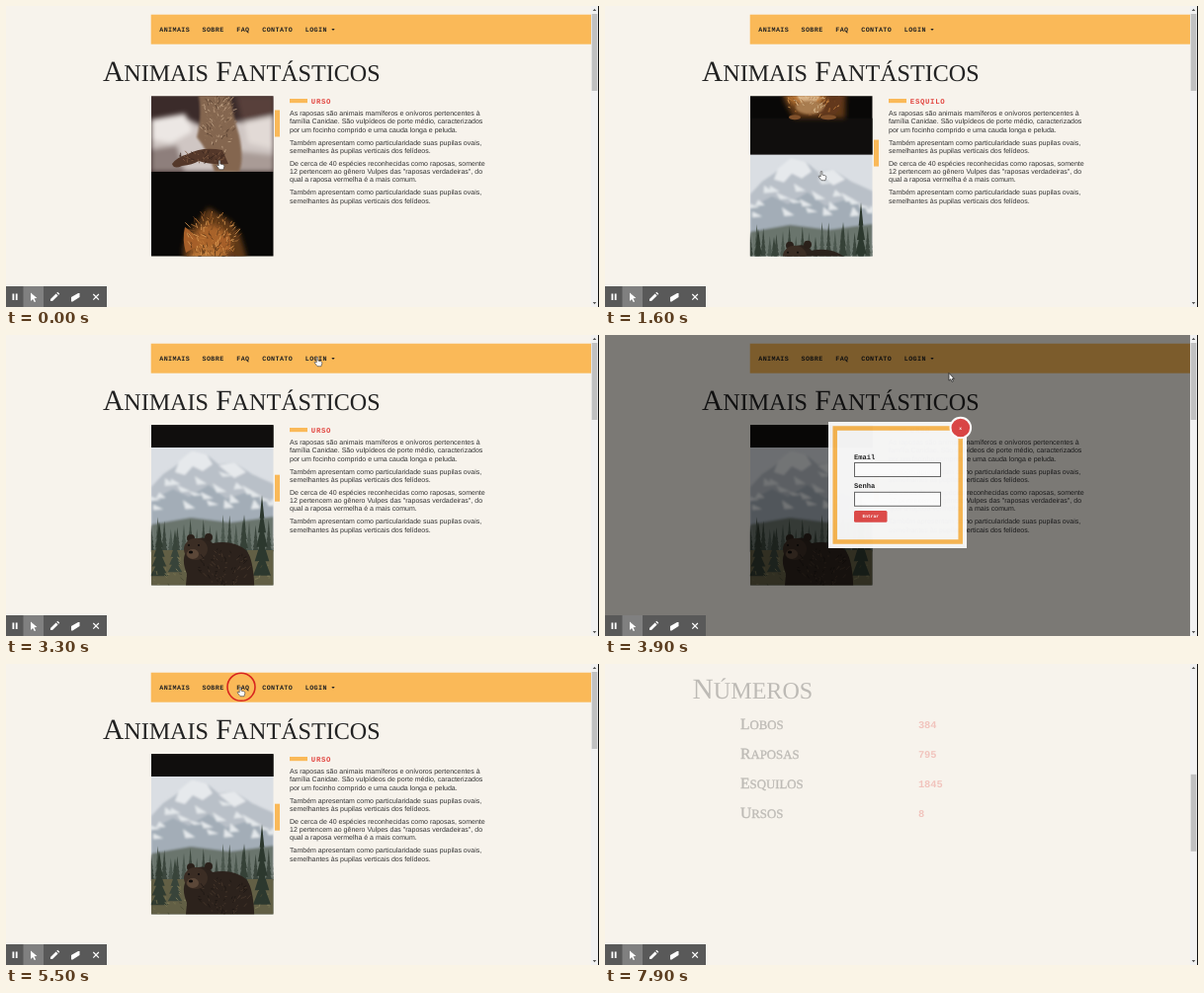
An HTML page for the animation above (8 s loop, 600 by 305 pixels).

```html
<!DOCTYPE html>
<html lang="pt">
<head>
<meta charset="utf-8">
<title>Animais</title>
<style>
html, body { margin: 0; width: 100%; height: 100%; overflow: hidden; background: #f7f3ec; }
svg { display: block; width: 600px; height: 305px; }
text { white-space: pre; text-rendering: geometricPrecision; }
.title, .sub { font-family: "Liberation Serif", "Noto Serif", serif; fill: #222; }
.title { font-size: 29.4px; }
.sub { font-size: 15.6px; stroke: #222; stroke-width: .35; }
.small { font-size: .82em; }
.mono { font: bold 7.1px "Liberation Mono", "DejaVu Sans Mono", monospace; fill: #222; }
.nav { font-size: 6.7px; letter-spacing: .4px; }
.label { font-size: 7.3px; letter-spacing: .7px; }
.red { fill: #e2453f; }
.count { font-size: 10.4px; }
.tiny { font-size: 4.6px; fill: #fff; }
.body { font: 7.03px "Liberation Sans", Arial, sans-serif; fill: #333; }
</style>
</head>
<body>
<svg id="stage" viewBox="0 0 600 305"></svg>
<script>
const YELLOW = '#fab958', RED = '#e04a48', LOOP = 8000;
const FAQ_Y = 274, NUMBERS_Y = 406;

let seed = 7;
const rnd = () => (seed = (seed * 16807) % 2147483647) / 2147483647;
const repeat = (n, fn) => Array.from({ length: n }, (_, i) => fn(i)).join('');
const rect = (x, y, w, h, fill, more = '') =>
  `<rect x="${x}" y="${y}" width="${w}" height="${h}" fill="${fill}" ${more}/>`;
const path = (d, fill, more = '') => `<path d="${d}" fill="${fill}" ${more}/>`;
const ellipse = (x, y, rx, ry, fill) => `<ellipse cx="${x}" cy="${y}" rx="${rx}" ry="${ry}" fill="${fill}"/>`;
const text = (x, y, cls, s, more = '') => `<text x="${x}" y="${y}" class="${cls}" ${more}>${s}</text>`;
const group = (id, content, more = '') => `<g id="${id}" ${more}>${content}</g>`;
const soft = (content, size = 'blur') => `<g filter="url(#${size})">${content}</g>`;
const smallCaps = s => s.replace(/(\S)(\S*)/g, (_, first, rest) => `${first}<tspan class="small">${rest.toUpperCase()}</tspan>`);

// Short random strokes inside an ellipse
function fur(n, x, y, rx, ry, colors, length = 4) {
  return repeat(n, i => {
    const a = rnd() * 6.283, r = Math.sqrt(rnd());
    const px = x + Math.cos(a) * r * rx, py = y + Math.sin(a) * r * ry;
    const dx = (rnd() - .5) * length + Math.cos(a) * length / 2;
    return `<path d="M${px.toFixed(1)} ${py.toFixed(1)}l${dx.toFixed(1)} ${(-length * rnd()).toFixed(1)}" stroke="${colors[i % colors.length]}" stroke-width=".8"/>`;
  });
}

// Pictures are 124 x 163
function monkey() {
  return rect(0, 0, 124, 163, '#3b2b2a') +
    soft(path('M0 112L30 106L50 116L88 112L124 116V163H0Z', '#cfc6c3') +
      path('M0 110L34 104L42 122L20 134L0 130Z', '#ece7e4') +
      path('M86 86H124V108L92 112Z', '#58403b') +
      path('M94 112L124 106V140L98 134Z', '#e2dad6') +
      path('M0 140L26 136L34 163H0Z', '#8e7f7c') +
      path('M88 142L124 146V163H84Z', '#a99b96')) +
    soft(path('M47 80H79Q82 104 89 126Q94 150 89 163H64Q58 142 46 128Q52 106 47 80Z', '#84664f'), 'blurFine') +
    fur(170, 68, 112, 17, 34, ['#a98a6e', '#5b4333', '#8f7057', '#c3a78b']) +
    path('M72 141Q52 137 37 145Q26 148 21 155Q23 161 31 157Q42 156 48 152Q60 156 78 155Z', '#54382a') +
    fur(50, 52, 149, 25, 6, ['#7d5840', '#3a261d']);
}

function squirrel() {
  const coat = ['#c07a38', '#7d4a20', '#dd9d57', '#5b3618'];
  return rect(0, 0, 124, 163, '#090807') +
    rect(0, 126, 124, 37, '#100e0d') +
    soft(path('M58 36L67 42L80 50L90 64L97 88L96 126H44L34 108L32 78L36 62L46 52Z', '#5e3718') +
      ellipse(60, 76, 19, 22, '#a9642b') + ellipse(78, 103, 17, 22, '#64391a') +
      ellipse(57, 96, 21, 19, '#b87435')) +
    path('M34 56Q42 60 48 74L35 82Q31 68 34 56ZM77 60Q83 70 78 82L66 74Z', '#a65f29') +
    fur(150, 62, 66, 25, 23, coat, 6) + fur(170, 64, 100, 30, 26, coat) +
    soft(ellipse(59, 102, 12, 8, '#d8b184') + ellipse(60, 115, 14, 7, '#a87c50'), 'blurFine') +
    fur(50, 60, 111, 15, 11, ['#dfc297', '#a4764a']) +
    ellipse(49, 88, 2.6, 3, '#100a07') + ellipse(73, 88, 2.6, 3, '#100a07') +
    ellipse(48.4, 87, .7, .7, '#fff') + ellipse(72.4, 87, .7, .7, '#fff') +
    ellipse(59, 96, 2.5, 1.6, '#4d2c19') +
    ellipse(45, 125, 6, 2.5, '#80502a') + ellipse(79, 125, 8, 2.5, '#80502a');
}

function tree(x, top, base, half, fill) {
  return path(repeat(5, i => {
    const y = top + (base - top) * i / 6, w = half * (i + 1.4) / 6;
    return `M${x} ${y - 2}L${x + w} ${y + (base - top) / 4}H${x - w}Z`;
  }), fill);
}

function bear() {
  return rect(0, 0, 124, 163, '#dadee3') +
    soft(path('M0 40L12 27L24 19L41 3L56 7L68 17L84 15L102 27L124 37V96H0Z', '#b9c0c8') +
      path('M41 3L56 7L62 17L52 24L42 19L34 28L24 25L28 14ZM68 18L84 15L96 25L84 31Z', '#e6e9ec') +
      path('M0 54L22 42L38 50L58 38L76 52L98 45L124 56V96H0Z', '#a3adb7') +
      repeat(22, i => path(`M${i * 6 - 4} ${24 + rnd() * 34}l${6 + rnd() * 9} ${3 + rnd() * 6}l-10 1z`, '#e3e7ea')) +
      path('M0 78L40 71L80 76L124 70V163H0Z', '#6a756d'), 'blurFine') +
    repeat(20, i => tree(i * 6.6, 70 + rnd() * 16, 108, 4, i % 2 ? '#4b574e' : '#3b463d')) +
    rect(0, 104, 124, 59, '#625f45') +
    tree(8, 77, 135, 10, '#303b31') + tree(24, 85, 130, 8, '#38443a') +
    tree(112, 50, 137, 10, '#2c382e') + tree(94, 70, 125, 7, '#354137') +
    fur(110, 62, 128, 62, 22, ['#8a8460', '#494a35', '#747050']) +
    path('M33 163L36 128Q31 116 34 108Q35 97 43 94Q54 88 62 97Q82 93 96 104Q106 116 104 163Z', '#2c221c') +
    ellipse(40, 92, 4, 4, '#2a201a') + ellipse(58, 91, 4, 4, '#2a201a') +
    ellipse(45, 103, 12, 11, '#3b2d24') + ellipse(42, 108, 6, 5, '#5b4738') +
    ellipse(40, 106, 2.2, 1.6, '#0e0b0a') + ellipse(38, 99, 1, 1, '#0e0b0a') + ellipse(48, 99, 1, 1, '#0e0b0a') +
    fur(80, 74, 122, 25, 20, ['#4a392d', '#1e1713']);
}

const paragraphs = [
  [111, 'As raposas são animais mamíferos e onívoros pertencentes à'],
  [119.4, 'família Canidae. São vulpídeos de porte médio, caracterizados'],
  [127.8, 'por um focinho comprido e uma cauda longa e peluda.'],
  [140.7, 'Também apresentam como particularidade suas pupilas ovais,'],
  [149, 'semelhantes às pupilas verticais dos felídeos.'],
  [161.5, 'De cerca de 40 espécies reconhecidas como raposas, somente'],
  [169.9, '12 pertencem ao gênero Vulpes das "raposas verdadeiras", do'],
  [178.3, 'qual a raposa vermelha é a mais comum.'],
  [191.1, 'Também apresentam como particularidade suas pupilas ovais,'],
  [199.5, 'semelhantes às pupilas verticais dos felídeos.']
];
const menu = [[155.3, 'ANIMAIS'], [198.5, 'SOBRE'], [233.3, 'FAQ'], [259.3, 'CONTATO'], [302.8, 'LOGIN']];
const questions = ['Qual a idade dos animais?', 'Eles são fantásticos?', 'Qual a diferença?', 'Como proteger?'];
const numbers = [['Lobos', 384], ['Raposas', 795], ['Esquilos', 1845], ['Ursos', 8]];

const home = rect(146.7, 8.7, 445.3, 30, YELLOW) +
  menu.map(([x, s]) => text(x, 26, 'mono nav', s)).join('') +
  path('M329.3 23h3.4l-1.7 2z', '#222') +
  text(98, 76, 'title', smallCaps('Animais Fantásticos')) +
  `<g clip-path="url(#frame)">${group('pictures',
    `<g transform="translate(0 -163)">${monkey()}</g>${squirrel()}<g transform="translate(0 163)">${bear()}</g>`)}</g>` +
  rect(272, 105.5, 5, 27, YELLOW, 'id="listThumb"') +
  group('info', rect(287, 94, 18, 4.2, YELLOW) + text(308.8, 98.6, 'mono label red', '', 'id="label"') +
    paragraphs.map(([y, s]) => text(287, y, 'body', s)).join('')) +
  group('dropdown', rect(194.7, 31, 75, 72.5, RED, 'stroke="#5a2a28" stroke-width="1"') +
    ['EMPRESA', 'EQUIPE', 'INVESTIDORES'].map((s, i) => text(203.8, 49 + i * 21, 'mono nav', s)).join(''));

const faq = text(99, 28, 'title', 'FAQ', 'style="font-size:28px;letter-spacing:-1.5px"') +
  questions.map((q, i) => {
    const y = 60 + i * 17.5, end = 162.5 + q.length * 4.26;
    return rect(147.3, y - 5, 10, 5, YELLOW) + text(160.3, y, 'mono red', q) +
      path(`M${end + 1} ${y - 4.5}h2.5v3.6m-1.3 -1.3l1.3 1.3l1.3 -1.3`, 'none', 'stroke="#e2453f" stroke-width=".9"');
  }).join('');

const counts = text(98.5, 35, 'title', smallCaps('Números')) +
  numbers.map(([name, n], i) =>
    text(147, 66 + i * 30, 'sub', smallCaps(name)) + text(326.8, 64.8 + i * 30, 'mono count red', n)).join('');

const field = (y, s) => text(252, y, 'mono', s) + rect(252.5, y + 4, 87, 14, '#fff', 'stroke="#666" stroke-width="1"');
const modal = rect(226, 88, 140, 128, '#f8f8f8') +
  rect(232.7, 94.5, 127, 115, '#f9f9f9', 'stroke="#f9b650" stroke-width="4.5"') +
  field(125.5, 'Email') + field(155.3, 'Senha') +
  rect(252, 178, 33.5, 11.7, RED, 'rx="1.5"') + text(260.4, 185.4, 'mono tiny', 'Entrar') +
  '<circle cx="359.8" cy="94" r="10.3" fill="#dd4444" stroke="#fff" stroke-width="2"/>' +
  text(358.3, 95.6, 'mono tiny', 'x');

const toolbar = rect(0, 284, 102, 21, '#595959') + rect(17.5, 284, 20.5, 21, '#808080') +
  rect(6.5, 291.5, 1.8, 6.5, '#fff') + rect(9.8, 291.5, 1.8, 6.5, '#fff') +
  path('M25 290.5l6.4 5.5l-2.9 .2l1.6 3.2l-1.4 .7l-1.6 -3.2l-2.1 2z', '#fff') +
  path('M45 299v-2l5.6 -5.6l2 2l-5.6 5.6zM51.3 290.8l1 -1l2 2l-1 1z', '#fff') +
  path('M66 295l7 -4h1.5v4l-7 4.5h-1.5z', '#fff') +
  path('M88.3 292l5.6 5.6m0 -5.6l-5.6 5.6', 'none', 'stroke="#fff" stroke-width="1.2"');

const pointers =
  group('arrow', path('M-2 -4.5V3.2L-.3 1.7L1 4.4L2.3 3.8L1.1 1.3H3.4Z', '#fff', 'stroke="#222" stroke-width=".8"')) +
  group('hand', path('M-1.8 -4.2q.9 -1 1.6 0V-.9l3 .7q1.3 .4 1 1.8L3 4.7H-1L-3.8 1q-.2 -1.1 .8 -.9l1.2 .9z', '#fff', 'stroke="#333" stroke-width=".6"'));

document.getElementById('stage').innerHTML =
  `<defs><clipPath id="frame"><rect x="146.8" y="91.3" width="123.7" height="162.3"/></clipPath>
  <filter id="blur"><feGaussianBlur stdDeviation="2.5"/></filter>
  <filter id="blurFine"><feGaussianBlur stdDeviation="1"/></filter></defs>` +
  rect(0, 0, 600, 305, '#f7f3ec') +
  group('page', home +
    `<g transform="translate(0 ${FAQ_Y})">${group('faq', faq)}</g>` +
    `<g transform="translate(0 ${NUMBERS_Y})">${group('counts', counts)}</g>`) +
  group('login', rect(0, 0, 592, 305, '#000', 'opacity=".5"') + group('modal', modal, 'opacity=".97"')) +
  rect(592, 0, 8, 305, '#f1f1f1') + rect(592.7, 8, 5.6, 78, '#c1c1c1', 'id="thumb"') +
  path('M593.7 5l1.8 -2.2l1.8 2.2zM593.7 300l1.8 2.2l1.8 -2.2z', '#555') + rect(599, 0, 1, 305, '#111') +
  toolbar +
  '<circle id="ring" cx="238" cy="23.3" r="14" fill="none" stroke="#d8251f" stroke-width="1.6"/>' +
  group('pointer', pointers);

const el = Object.fromEntries([...document.querySelectorAll('[id]')].map(n => [n.id, n]));
const set = (name, attrs) => Object.entries(attrs).forEach(([k, v]) => el[name].setAttribute(k, v));
const show = (name, on) => set(name, { visibility: on ? 'visible' : 'hidden' });
const ramp = (t, a, b) => Math.min(1, Math.max(0, (t - a) / (b - a)));
const smooth = p => p * p * (3 - 2 * p);
const within = (t, ...spans) => spans.some(([a, b]) => t >= a && t < b);

const track = [[0, 217, 161], [600, 220, 172], [1900, 220, 172], [2250, 212, 29], [2700, 212, 29],
  [3300, 316, 27], [3550, 316, 27], [3900, 350, 43], [4250, 360, 96], [4600, 360, 96],
  [5300, 238, 28], [5650, 238, 28], [6300, 138, 109.5], [LOOP, 138, 109.5]];

function pointerAt(t) {
  const i = track.findIndex(k => k[0] > t);
  const [t0, x0, y0] = track[i - 1], [t1, x1, y1] = track[i];
  const p = smooth(ramp(t, t0, t1));
  return [x0 + (x1 - x0) * p, y0 + (y1 - y0) * p];
}

// Blocks fade in while sliding from the left
function reveal(name, t, start) {
  const left = (1 - ramp(t, start, start + 350)) ** 2;
  set(name, { opacity: 1 - left, transform: `translate(${-13.5 * left} 0)` });
}

function draw(t) {
  const top = 168 - 129 * smooth(ramp(t, 50, 600)) - 88 * smooth(ramp(t, 1350, 1800));
  set('pictures', { transform: `translate(147 ${top})` });
  set('listThumb', { y: 105.5 + (168 - top) / 6 });

  el.label.textContent = within(t, [650, 1850]) ? 'ESQUILO' : 'URSO';
  reveal('info', t, t < 650 ? -LOOP : t < 1850 ? 650 : 1850);

  show('dropdown', within(t, [2300, 2800]));
  set('dropdown', { opacity: .9 + .1 * ramp(t, 2300, 2500) });

  const open = ramp(t, 3500, 3800) - ramp(t, 4500, 4800);
  set('login', { opacity: open });

  const scroll = FAQ_Y * smooth(ramp(t, 5550, 6250)) + (NUMBERS_Y - FAQ_Y) * smooth(ramp(t, 7300, 7600));
  set('page', { transform: `translate(0 ${-scroll})` });
  set('thumb', { y: 8 + scroll / 3.91 });
  reveal('faq', t, 6350);
  reveal('counts', t, 7850);

  const [x, y] = pointerAt(t);
  const hand = within(t, [0, 2800], [3150, 3650], [4200, 4700], [5200, 5800]);
  set('pointer', { transform: `translate(${x} ${y})`, display: t < 7400 ? 'inline' : 'none' });
  show('hand', hand);
  show('arrow', !hand);
  show('ring', within(t, [5500, 5700]));
}

// The picture advances in steps of 100 ms
const begin = performance.now();
function tick() {
  const t = (performance.now() - begin) % LOOP;
  draw(Math.floor(t / 100) * 100);
  requestAnimationFrame(tick);
}
tick();
</script>
</body>
</html>
```
